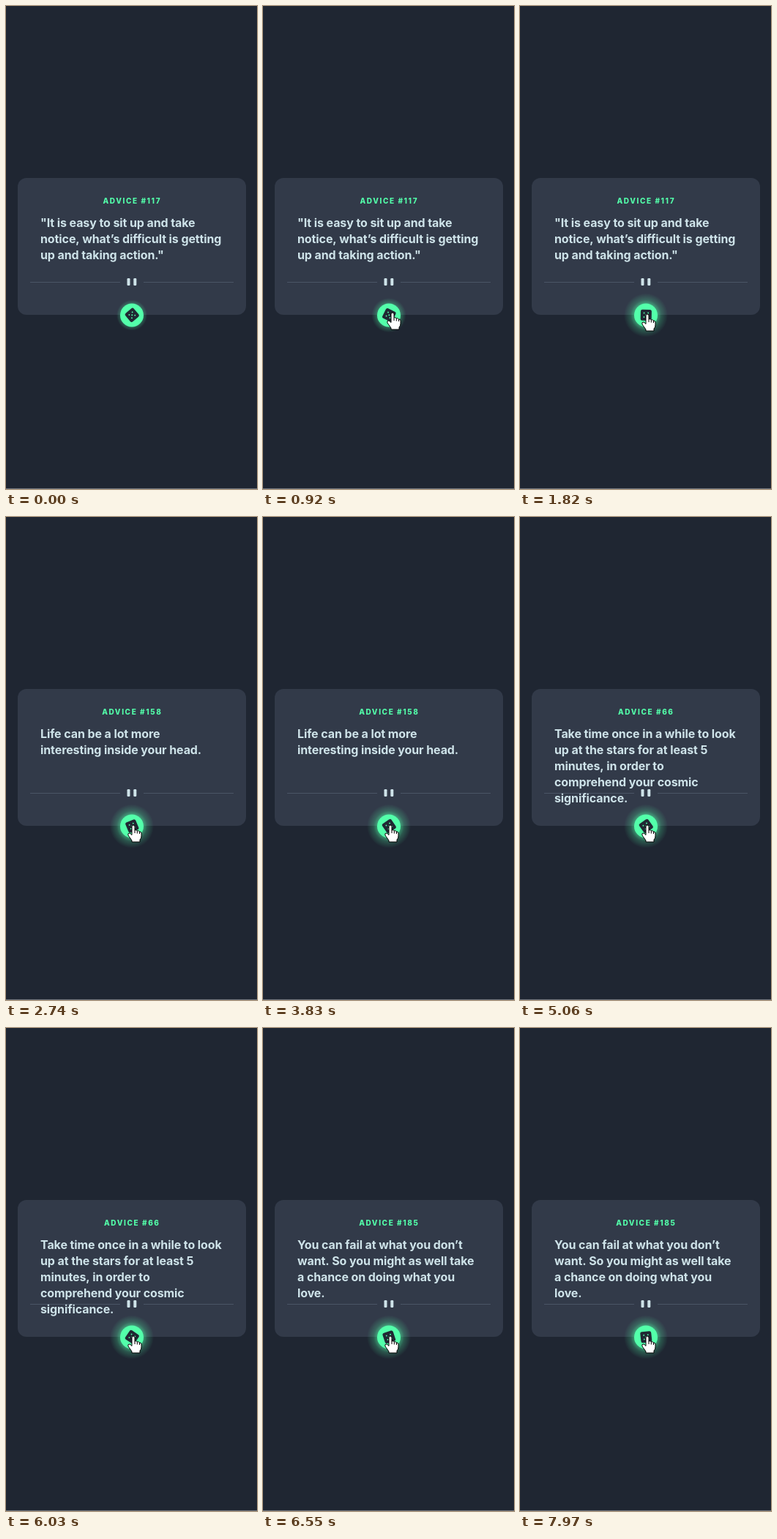
Animation of 343x660 px, one loop 8000 ms. Source, as an HTML page with a canvas:

```html
<!DOCTYPE html>
<html lang="en">
<head>
<meta charset="utf-8">
<title>Advice card</title>
<style>
  html, body { margin: 0; width: 100%; height: 100%; overflow: hidden; background: #1f2632; }
  canvas { display: block; width: 343px; height: 660px; }
</style>
</head>
<body>
<canvas id="stage"></canvas>
<script>
const W = 343, H = 660, LOOP = 8000;
const GREEN = '#53ffaa', DARK = '#202733', CARD = '#323a49', PALE = '#cee3e9';
const BUTTON = { x: 172, y: 422.5, r: 16 };

const quotes = [
  { from: 0, id: 117, lines: ['"It is easy to sit up and take', 'notice, what’s difficult is getting', 'up and taking action."'] },
  { from: 2690, id: 158, lines: ['Life can be a lot more', 'interesting inside your head.'] },
  { from: 4600, id: 66, lines: ['Take time once in a while to look', 'up at the stars for at least 5', 'minutes, in order to', 'comprehend your cosmic', 'significance.'] },
  { from: 6300, id: 185, lines: ['You can fail at what you don’t', 'want. So you might as well take', 'a chance on doing what you', 'love.'] }
];

const arrow = new Path2D('M0 0V16.5L3.8 13L6.4 18.8L9 17.6L6.4 12H11.6Z');
const hand = new Path2D('M-2 2Q-2 0 0 0Q2 0 2 2V7Q4 6 5.3 7.8Q7.5 7 8.5 9Q11 8.8 11 11V15Q11 18 9 20V23H-2V21L-7 14Q-8 11 -5.5 11Q-4 11.2 -2 13.5Z');
const knuckles = new Path2D('M2 7V11M5.3 8V11.5M8.5 9V12');

const canvas = document.getElementById('stage');
const ctx = canvas.getContext('2d');
const dpr = window.devicePixelRatio || 1;
canvas.width = W * dpr;
canvas.height = H * dpr;

const mix = (a, b, k) => a + (b - a) * k;
const progress = (t, start, end) => Math.min(1, Math.max(0, (t - start) / (end - start)));
const smooth = k => k * k * (3 - 2 * k);

function roundBox(x, y, w, h, r, fill) {
  ctx.beginPath();
  ctx.roundRect(x, y, w, h, r);
  ctx.fillStyle = fill;
  ctx.fill();
}

function disc(x, y, r, fill) {
  ctx.beginPath();
  ctx.arc(x, y, r, 0, Math.PI * 2);
  ctx.fillStyle = fill;
  ctx.fill();
}

function write(text, x, y, font, spacing, color) {
  ctx.font = font;
  ctx.letterSpacing = spacing + 'px';
  ctx.fillStyle = color;
  ctx.fillText(text, x, y);
}

function drawCard(t) {
  roundBox(16, 235, 312, 187, 12, CARD);
  ctx.fillStyle = '#4a5566';
  ctx.fillRect(33, 377, 123, 1);
  ctx.fillRect(188, 377, 123, 1);
  for (const x of [165.5, 174.3]) roundBox(x, 372, 4, 10, 1.3, PALE);

  const quote = quotes.filter(q => t >= q.from).pop();
  ctx.textAlign = 'center';
  write('ADVICE #' + quote.id, 172.3, 270.3, '800 10px Inter, sans-serif', 1.6, GREEN);
  ctx.textAlign = 'left';
  quote.lines.forEach((line, i) =>
    write(line, 47, 302 + i * 22, '700 16px Inter, sans-serif', -0.1, PALE));
}

function drawGlow(hover) {
  const { x, y, r } = BUTTON;
  const reach = mix(21, 30, hover);
  const glow = ctx.createRadialGradient(x, y, r - 1, x, y, reach);
  glow.addColorStop(0, `rgba(83,255,170,${mix(0.3, 0.55, hover)})`);
  glow.addColorStop(0.4, `rgba(83,255,170,${mix(0.18, 0.22, hover)})`);
  glow.addColorStop(1, 'rgba(83,255,170,0)');
  disc(x, y, reach, glow);
}

function drawButton(t) {
  drawGlow(smooth(progress(t, 740, 1250)));
  disc(BUTTON.x, BUTTON.y, BUTTON.r, GREEN);

  // One turn takes five seconds.
  ctx.save();
  ctx.translate(172.3, 422.3);
  ctx.rotate((-40 + t * 0.072) * Math.PI / 180);
  roundBox(-7.5, -7.5, 15, 15, 2.5, DARK);
  for (const [x, y] of [[0, 0], [-1, -1], [1, -1], [-1, 1], [1, 1]]) {
    disc(x * 2.8, y * 2.8, 0.94, GREEN);
  }
  ctx.restore();
}

function drawCursor(t) {
  if (t < 60) return;
  const glide = smooth(progress(t, 60, 850));
  const settle = smooth(progress(t, 950, 1500));
  const x = mix(313, 177, glide) - 3 * settle;
  const y = mix(641, 419, glide) + 2 * settle;
  const over = Math.hypot(x - BUTTON.x, y - BUTTON.y) < BUTTON.r;
  const shape = over ? hand : arrow;

  ctx.save();
  ctx.translate(x, y);
  ctx.lineWidth = 1;
  ctx.lineJoin = 'round';
  ctx.fillStyle = '#fff';
  ctx.strokeStyle = '#000';
  ctx.fill(shape);
  ctx.stroke(shape);
  if (over) ctx.stroke(knuckles);
  ctx.restore();
}

function draw(t) {
  ctx.setTransform(dpr, 0, 0, dpr, 0, 0);
  ctx.fillStyle = '#1f2632';
  ctx.fillRect(0, 0, W, H);
  ctx.fillStyle = '#6f737b';
  ctx.fillRect(0, H - 1, W, 1);
  drawCard(t);
  drawButton(t);
  drawCursor(t);
}

const begin = performance.now();
function tick() {
  draw((performance.now() - begin) % LOOP);
  requestAnimationFrame(tick);
}
tick();
</script>
</body>
</html>
```
